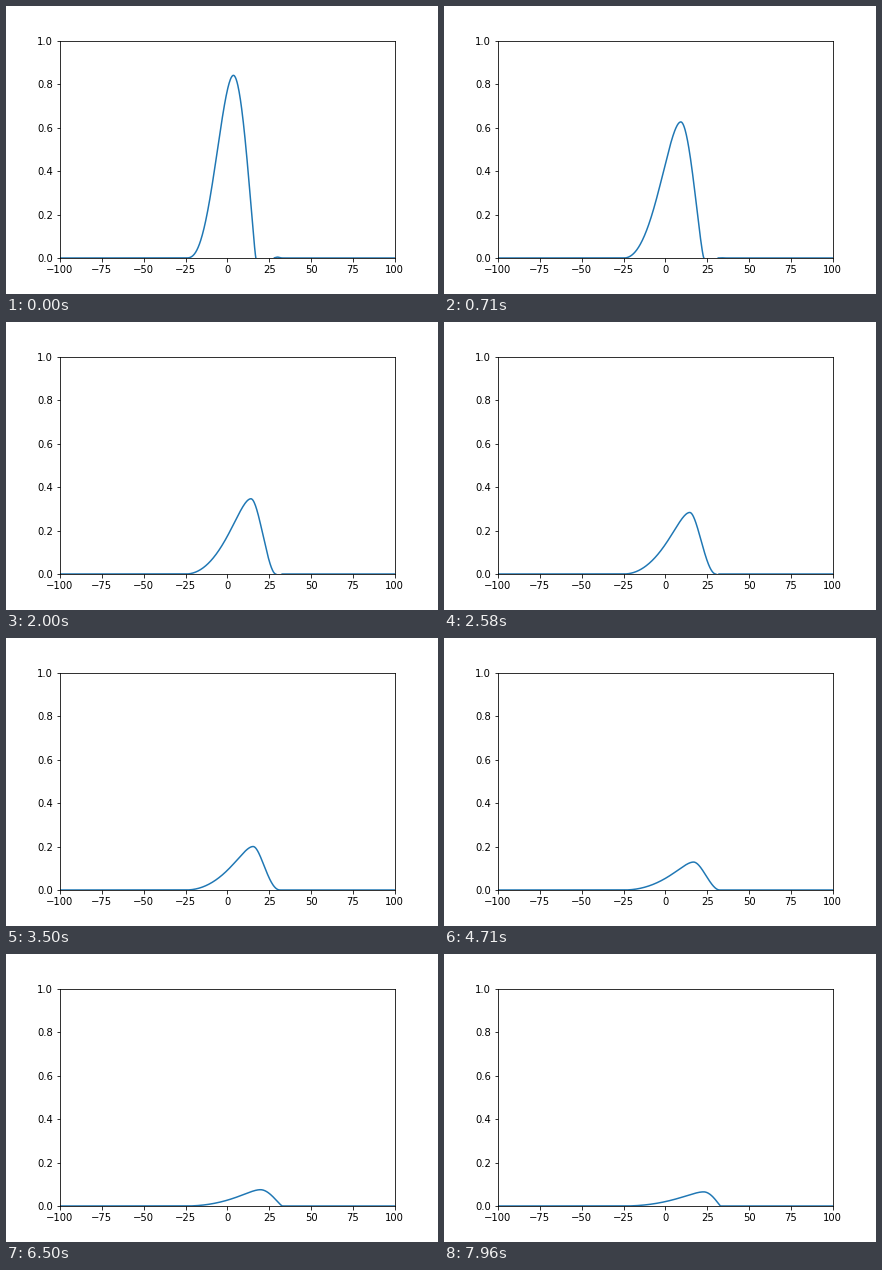
Animation, 432 px wide and 288 px high, one loop 8000 ms. Source, as a matplotlib script:

```python
import numpy as np
import matplotlib.pyplot as plt
from matplotlib.animation import FuncAnimation

FRAMES, INTERVAL = 200, 40
FOOT = -25  # left end of the pulse

# Peak height decays almost exponentially between these moments (seconds)
TIMES = [0, 0.84, 1.46, 2.58, 3.5, 4.71, 6.5, 7.96]
HEIGHTS = [0.84, 0.59, 0.423, 0.283, 0.2, 0.128, 0.075, 0.065]


def rise(u, p, r):
    """Slope from 0 to 1 with a rounded top; p bends the foot, r sharpens the top."""
    u = np.clip(u, 0, 1)
    return (r * u**p - p * u**r) / (r - p)


def wave(x, t):
    height = np.exp(np.interp(t, TIMES, np.log(HEIGHTS)))
    peak = 13.6 + 0.145 * t**2 - 10 * np.exp(-(t / 0.8)**1.6)
    front = 33 - 16 * np.exp(-t / 1.5)

    # The back relaxes into a ramp, the front softens and steepens again
    p_back = 2.1 + 0.9 * np.exp(-3 * t)
    r_back = 12 - 8 * np.exp(-t / 2)
    p_front = 1.13 + 0.97 * np.exp(-((t - 3.4) / 2.2)**2)
    back = rise((x - FOOT) / (peak - FOOT), p_back, r_back)
    fore = rise((front - x) / (front - peak), p_front, 2 * p_front)
    y = height * np.where(x < peak, back, fore)

    # Undershoot ahead of the front, followed by a faint ripple
    gap = max(0.01, 11 - 3.6 * t)
    y -= 0.05 * np.exp(-t) * np.sin(np.pi * np.clip((x - front) / gap, 0, 1))
    y += 0.004 * np.exp(-((x - front - gap - 2) / 1.5)**2 - 2 * t)
    return y


grid = np.linspace(-100, 100, 801)
fig, ax = plt.subplots(figsize=(6, 4), dpi=72)
fig.subplots_adjust(left=0.125, right=0.9, bottom=0.125, top=0.88)
ax.set_xlim(-100, 100)
ax.set_ylim(0, 1)
line, = ax.plot(grid, wave(grid, 0), color="#1f77b4", lw=1.5)


def update(frame):
    # A frame shows the middle of its time slot, except the very first
    t = (frame + 0.5) * INTERVAL / 1000 if frame else 0
    line.set_ydata(wave(grid, t))
    return line,


anim = FuncAnimation(fig, update, frames=FRAMES, interval=INTERVAL,
                     repeat=True, repeat_delay=0)
plt.show()
```
